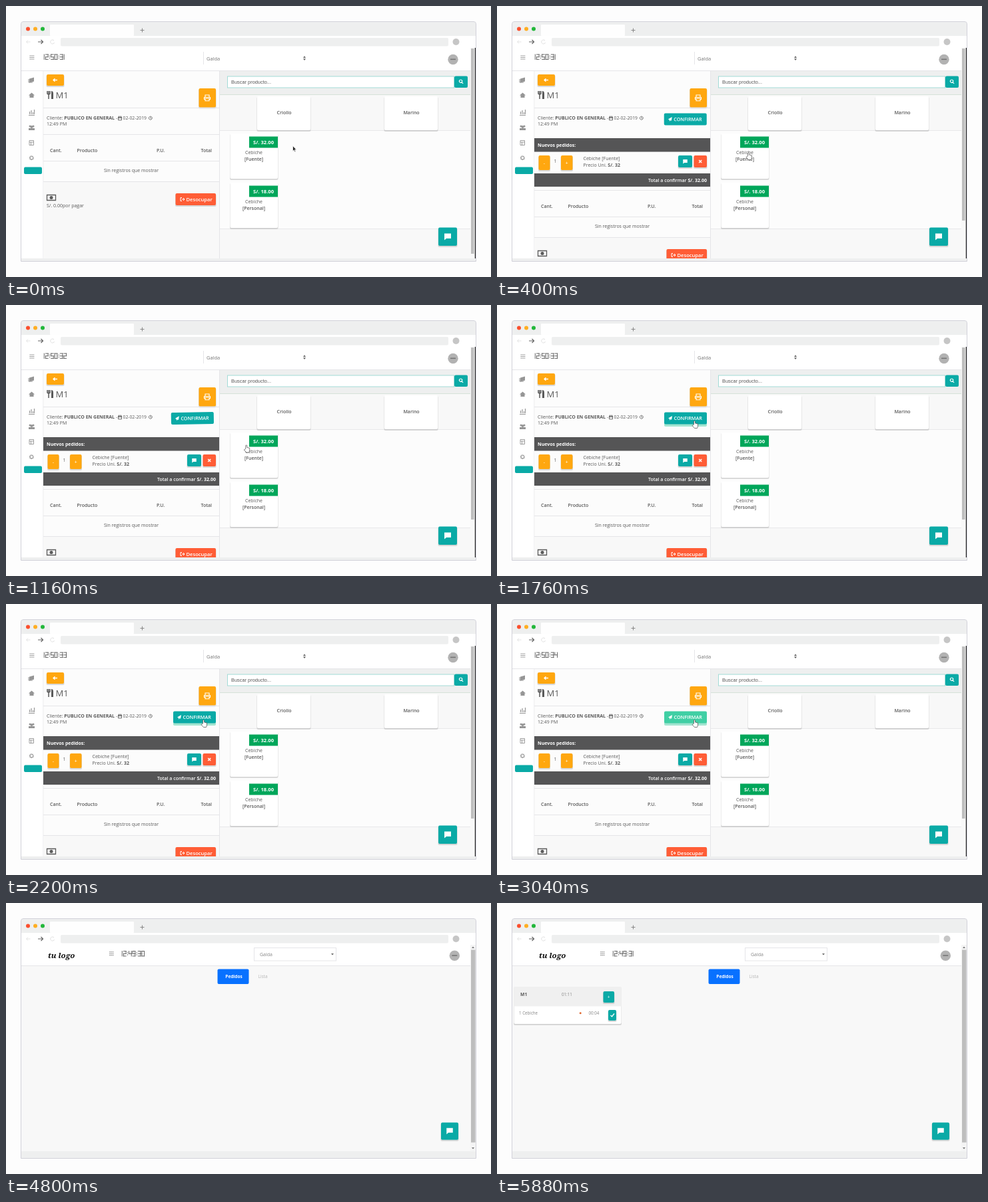
These frames come from a looping animation (728x408 px, 6 s). An HTML page:

```html
<!DOCTYPE html>
<html lang="es">
<head>
<meta charset="utf-8">
<style>
html, body { margin: 0; width: 100%; height: 100%; overflow: hidden; background: #fdfdfd; }
svg { display: block; width: 100vw; height: 100vh; }
text { font-family: "Open Sans", sans-serif; white-space: pre; }
</style>
</head>
<body>
<svg id="stage" viewBox="0 0 728 408"></svg>
<script>
const INK = '#5a5a5a', TINT = '#eeefef', PALE = '#f8f8f8', SOFT = '#fcfcfc', EDGE = '#e5e5e8';
const TEAL = '#0aaaa6', ORANGE = '#ffa70f', RED = '#ff5d36', DARK = '#555556';
const LOOP = 6000;

const rect = (x, y, w, h, fill, more = '') =>
  `<rect x="${x}" y="${y}" width="${w}" height="${h}" fill="${fill}" ${more}/>`;
const round = (x, y, w, h, fill, more = '') => rect(x, y, w, h, fill, 'rx="2" ' + more);
const raised = (x, y, w, h, fill) =>
  round(x - .5, y + 1, w + 1, h + 1, '#707070', 'opacity=".25"') + round(x, y, w, h, fill);
const text = (x, y, s, more = '', size = 7, fill = INK) =>
  `<text x="${x}" y="${y}" font-size="${size}" fill="${fill}" ${more}>${s}</text>`;
const path = (d, color = INK, width = 1, more = '') =>
  `<path d="${d}" fill="none" stroke="${color}" stroke-width="${width}" ${more}/>`;
const shape = (d, fill, more = '') => `<path d="${d}" fill="${fill}" ${more}/>`;
const dot = (x, y, r, fill) => `<circle cx="${x}" cy="${y}" r="${r}" fill="${fill}"/>`;
const group = (id, body, more = '') => `<g id="${id}" ${more}>${body}</g>`;
const BOLD = 'font-weight="700"', SEMI = 'font-weight="600"';
const MID = 'text-anchor="middle" ', END = 'text-anchor="end" ';

const bubble = (x, y, s = 1) =>
  shape('M-5-4.5h10v7.5h-7l-3 2.5z', '#fff', `transform="translate(${x} ${y}) scale(${s})"`);
const menu = (x, y) => path(`M${x} ${y}h7m-7 2.5h7m-7 2.5h7`, '#8c8c8c', 1.1, 'stroke-dasharray="1.8 .4"');
const avatar = (x, y) => dot(x, y, 7.7, '#b2b2b2') + rect(x - 4, y - 1, 8, 1.6, '#767676');

function browser() {
  return rect(0, 0, 728, 408, '#fdfdfd') +
    rect(22.5, 23.5, 682.5, 361, '#fff', 'rx="3"') +
    shape('M23 45V27q0-3 3-3H702q3 0 3 3V45z', TINT) +
    rect(66, 28, 126, 17, '#fefefe', 'rx="1"') +
    dot(33, 34.5, 3, '#fb4f2e') + dot(44, 34.5, 3, '#ffae22') + dot(55, 34.5, 3, '#22b73a') +
    path('M201.5 36.5h6m-3-3v6', '#888') +
    path('M36.5 54h-6m2.5-2.5-2.5 2.5 2.5 2.5', '#e4e4e4') +
    path('M48 54h7.5m-3-3 3 3-3 3', '#666', 1.2) +
    path('M72 52a3 3 0 1 0 .6 3', '#e0e0e0') +
    round(82, 48, 582, 12.5, TINT) + dot(675.5, 54, 5, '#c6c6c6');
}

function sidebar() {
  const c = '#969696';
  return path('M56 98V380', EDGE) +
    shape('M35 109.5l7-2v6l-7 2z', c) + path('M34 110v5h6', c) +
    shape('M34 134.5l4.5-4 4.5 4h-1.5v3.5h-6v-3.5z', c) +
    path('M34 164.5h9M35.5 163v-4m2.5 4v-6m2.5 6v-3m2 3v-7', c, 1.2) +
    dot(36, 181, 1.5, c) + dot(41, 181, 1.5, c) + dot(38.5, 182, 2, c) +
    shape('M34 187v-3h9v3z', c) +
    path('M35 202.5h6.5v7H35zm0 2.5h6.5M37.5 205v4.5', c, .9) +
    path('M38.3 226.2a2.5 2.5 0 1 0 .1 0', c, 1.8, 'stroke-dasharray="1.6 .5"') +
    round(27, 242.5, 27, 10.5, TEAL);
}

function table() {
  return path('M56 193.5H320M56 233.5H320M56 264.5H320', EDGE) +
    rect(56, 265, 264, 115, PALE) +
    text(66, 220, 'Cant.', SEMI) + text(106.5, 220, 'Producto', SEMI) +
    text(226, 220, 'P.U.', SEMI) + text(309, 220, 'Total', END + SEMI) +
    text(188, 250, 'Sin registros que mostrar', MID) +
    path('M61.5 284.5h13v8h-13z', INK, 1.3) + dot(68, 288.5, 2.5, INK) +
    text(61, 303, 'S/. 0.00por pagar') +
    raised(254.5, 282, 60.5, 18, RED) +
    path('M264 288.5h-2v5h2m0-2.5h4m-2-2 2 2-2 2', '#fff') +
    text(270.5, 294, 'Desocupar', SEMI, 7.6, '#fff');
}

function order() {
  return rect(56, 199, 264, 74, SOFT) +
    rect(56, 199, 264, 20.5, DARK) + text(61, 212, 'Nuevos pedidos:', BOLD, 7, '#fff') +
    raised(62.5, 225, 17, 22, ORANGE) + raised(96, 225, 17.5, 22, ORANGE) +
    text(71, 238.5, '-', MID, 7, '#fff') + text(104.7, 238.5, '+', MID, 7, '#fff') +
    text(87.5, 236, '1', MID) +
    text(129.5, 232, 'Cebiche [Fuente]') +
    text(129.5, 242, 'Precio Uni. <tspan font-weight="700">S/. 32</tspan>') +
    raised(272, 225, 21, 18, TEAL) + bubble(282.5, 234, .65) +
    raised(295.5, 225, 19.5, 18, RED) + path('M303.2 232l4 4m0-4-4 4', '#fff', 1.5) +
    rect(56, 252, 264, 20, DARK) +
    text(315, 265, 'Total a confirmar <tspan font-weight="700">S/. 32.00</tspan>', END + SEMI, 7, '#fff') +
    group('confirm',
      round(251, 164, 64, 19, '#35c79c', 'id="glow" opacity="0"') +
      round(251, 161.5, 64, 18, TEAL, 'id="face"') +
      shape('M263 167l-6 3.5 1.8.8.4 2.4 1.2-1.6 1.6.6z', '#fff') +
      text(265.5, 173.2, 'CONFIRMAR', SEMI, 7.2, '#fff'));
}

function product(y, name, price) {
  return raised(336.5, y, 71.5, 68, '#fff') +
    rect(365, y + 4.5, 43, 17, '#00a65a') +
    text(386.5, y + 15.5, price, MID + BOLD, 7.6, '#fff') +
    text(372, y + 31, 'Cebiche', MID) + text(372, y + 41, name, MID + SEMI);
}

function sales() {
  const category = (x, name) => raised(x, 136, 80, 51, '#fff') +
    text(x + 40.5, 163.3, name, MID + SEMI);
  return rect(23, 63, 682, 317, '#fff') + menu(35.5, 75) +
    path('M296.5 69V88', EDGE) + text(301, 81.5, 'Galda', '', 7.5, '#757575') +
    shape('M446 78l2-2.7 2 2.7zm0 1.2h4l-2 2.7z', '#666') + avatar(671, 80.5) +
    path('M23 97.5H697', EDGE) + sidebar() +
    rect(56.5, 98, 264, 282, SOFT) +
    raised(61, 103, 26, 17, ORANGE) + path('M77 111.5h-6m2.5-2.3-2.5 2.3 2.5 2.3', '#fff', 1.3) +
    path('M62 128v4q2 2 4 0v-4m-2 0v12', INK, 1.5) +
    shape('M68 140v-12q3 0 3 4v8z', INK) +
    text(74.5, 138.7, 'M1', '', 13) +
    raised(289.5, 124, 25.5, 28.5, ORANGE) +
    path('M299 137.5v-3.5h6v3.5m-6 3h-1.5v-3h9v3h-1.5m-6-1.2h6v3.4h-6z', '#fff', 1.1) +
    path('M56 153.5H320', EDGE) +
    text(61, 171, 'Cliente: <tspan font-weight="700">PUBLICO EN GENERAL</tspan> -') +
    path('M168.5 167h5v4.8h-5zm0 1.5h5m-3.8-3v2m2.6-2v2', INK, .9) +
    text(175.5, 171, '02-02-2019', '', 6.8) +
    path('M216.8 166.2a2.5 2.5 0 1 0 .1 0m0 1.1v1.6h1.2', INK, .8) +
    text(61, 180.3, '12:49 PM') +
    `<g clip-path="url(#page)">${group('table', table()) + group('order', order())}</g>` +
    rect(321, 98, 376, 35, TINT) + rect(321, 134, 376, 54, PALE) +
    rect(321, 188, 376, 147, SOFT) + rect(321, 335, 376, 45, PALE) +
    path('M320.5 98V380', EDGE) +
    path('M321 133.5H697', '#d5e2d9') + path('M321 187.5H697M321 335.5H697', EDGE, .8) +
    rect(332.5, 106, 340, 17, '#fff', 'stroke="#a2dbd6"') +
    text(338, 117, 'Buscar producto...', 'style="font-family:\'Liberation Sans\',sans-serif"', 7.4) +
    round(673, 105.5, 20, 17.5, TEAL) +
    path('M682.5 111a2.2 2.2 0 1 0 .1 0m1.5 3.9 2 2', '#fff', 1.2) +
    category(377, 'Criollo') + category(568, 'Marino') +
    product(192, '[Fuente]', 'S/. 32.00') + product(266, '[Personal]', 'S/. 18.00') +
    raised(649, 333.5, 28, 27.5, TEAL) + bubble(663, 347) +
    rect(697, 63, 7, 317, '#f8f8f8') + rect(698, 64, 4.5, 309, '#bebebe', 'id="thumb"') +
    rect(703.8, 63, 1.4, 317, '#222') +
    rect(23, 380, 682, 4, TINT);
}

function kitchen() {
  return rect(23, 63, 682, 317, '#fff') + rect(23, 94.5, 674, 279, PALE) +
    rect(23, 373.5, 682, 10.5, TINT) + path('M23 94.5H697', EDGE) +
    text(63, 83, 'tu logo', BOLD + ' font-style="italic" style="font-family:\'Noto Serif\',serif"', 11.5, '#111') +
    menu(155, 73.8) +
    rect(372.5, 67.5, 123, 19.5, '#fff', `stroke="${EDGE}"`) +
    text(381, 80, 'Galda', '', 7, '#858585') + shape('M488 76h4l-2 2.5z', '#666') +
    avatar(673.3, 79.3) +
    round(317.5, 99.5, 47, 22.5, '#0871ff') +
    text(342, 113.3, 'Pedidos', MID + BOLD, 6.5, '#fff') + text(378.5, 113.3, 'Lista', '', 6.5, '#b5b5b5') +
    raised(653, 330.5, 26, 26, TEAL) + bubble(666, 343, .95) +
    rect(697, 63, 8, 310.5, '#f4f4f4') + rect(698, 70.5, 6.5, 290, '#bebebe') +
    shape('M699 68h4l-2-2.5zm0 300h4l-2 2.5z', '#777') +
    group('ticket',
      raised(25.5, 126, 161, 56, '#fff') + rect(25.5, 126, 161, 29.5, '#f0f0f0') +
      text(35, 139.8, 'M1', BOLD, 6.8) +
      text(97, 139.5, '', 'id="total"', 6.2, '#858585') +
      raised(159.5, 133, 16.5, 17, TEAL) + text(167.7, 143.8, '+', MID, 6.5, '#fff') +
      text(33, 167.6, '1 Cebiche', '', 6.2, '#858585') + dot(125.2, 165.7, 1.5, '#e06a33') +
      text(137.5, 167.6, '', 'id="wait"', 6.2, '#858585') +
      raised(167, 161, 12, 16, TEAL) + path('M170.5 169l2 2 3.5-4.5', '#fff', 1.3));
}

const hand = 'M-1.5 0V-5q1-1 2 0v3l4 1v4l-1 2.5h-4l-3.5-4z';
const arrow = 'M-1.5-2.5v8l1.8-1.6 1.3 2.8 1.2-.6-1.3-2.7h2.3z';

const svg = document.getElementById('stage');
svg.innerHTML = '<clipPath id="page"><rect x="23" y="63" width="682" height="317"/></clipPath>' +
  browser() + group('sales', sales()) + group('kitchen', kitchen()) +
  path('', '#555', .9, 'id="clock" stroke-linecap="square"') +
  path('M22.5 384.5V27q0-3.5 3.5-3.5H702q3.5 0 3.5 3.5V384.5z', '#d2d2da') +
  shape(arrow, '#222', 'id="cursor" stroke="#fff" stroke-width=".7"');

const $ = id => document.getElementById(id);
const set = (id, name, value) => $(id).setAttribute(name, value);
const show = (id, on) => set(id, 'visibility', on ? 'visible' : 'hidden');
const clamp = v => Math.min(1, Math.max(0, v));
const ease = v => { v = clamp(v); return v * v * (3 - 2 * v); };

// Seven-segment strokes, clockwise from the top, the middle one last
const STROKES = [[0, 0, 'h3.6'], [3.6, 0, 'v3.7'], [3.6, 3.7, 'v3.7'], [0, 7.4, 'h3.6'],
  [0, 3.7, 'v3.7'], [0, 0, 'v3.7'], [0, 3.7, 'h3.6']];
const DIGITS = [63, 6, 91, 79, 102, 109, 125, 7, 127, 111];

function clockPath(label, x, y) {
  let d = '';
  const line = (dx, dy, to) => { d += `M${x + dx} ${y + dy}${to}`; };
  for (const c of label) {
    if (c === ':') { line(.5, 2.2, 'v.4'); line(.5, 5.2, 'v.4'); }
    else if (c === '1') line(.3, 0, 'v7.4');
    else STROKES.forEach((s, i) => { if (DIGITS[c] >> i & 1) line(...s); });
    x += c === ':' || c === '1' ? 2.5 : 5.6;
  }
  return d;
}

// Decaying shake: [progress, shift, degrees]
const WOBBLE = [[0, 0, 0], [.15, -16, -5], [.3, 12.8, 3], [.45, -9.6, -3],
  [.6, 6.4, 2], [.75, -3.2, -1], [1, 0, 0]];
function wobble(p) {
  p = clamp(p);
  const i = Math.max(1, WOBBLE.findIndex(k => k[0] >= p));
  const a = WOBBLE[i - 1], b = WOBBLE[i], q = ease((p - a[0]) / (b[0] - a[0]));
  return [a[1] + (b[1] - a[1]) * q, a[2] + (b[2] - a[2]) * q];
}

function draw(t) {
  const cooking = t >= 4200, ordered = t >= 390;
  show('sales', !cooking);
  show('kitchen', cooking);
  set('clock', 'd', cooking
    ? clockPath('12:49:' + (t < 5300 ? 30 : 31), 174, 72.5)
    : clockPath('12:50:' + (31 + Math.floor((t + 400) / 1000)), 57, 73));

  set('order', 'display', ordered ? 'inline' : 'none');
  set('table', 'transform', `translate(0 ${ordered ? 84 : 0})`);
  set('thumb', 'height', ordered ? 259 : 309);
  const [shift, turn] = wobble((t - 390) / 1000);
  set('confirm', 'transform', `translate(${shift} 0) rotate(${turn} 283 170.5)`);
  set('glow', 'opacity', .45 * ease((t - 1500) / 200));
  const sent = ease((t - 2600) / 250), mix = (a, b) => Math.round(a + (b - a) * sent);
  set('face', 'fill', `rgb(${mix(10, 64)},${mix(170, 207)},${mix(166, 164)})`);

  const first = ease((t - 40) / 290), second = ease((t - 1000) / 550);
  const x = 432 - 54 * first - 81 * second, y = 213 + 13 * first - 46 * second;
  const pointing = first > .6 && (second < .35 || second > .75);
  set('cursor', 'd', pointing ? hand : arrow);
  set('cursor', 'fill', pointing ? '#fff' : '#222');
  set('cursor', 'stroke', pointing ? '#4a4a4a' : '#fff');
  set('cursor', 'transform', `translate(${x} ${y})`);
  set('cursor', 'display', t < 3400 ? 'inline' : 'none');

  const late = t >= 5760;
  set('ticket', 'opacity', clamp((t - 5200) / 160));
  $('total').textContent = late ? '01:11' : '01:10';
  $('wait').textContent = late ? '00:04' : '00:03';
}

const start = performance.now();
function frame() {
  draw((performance.now() - start) % LOOP);
  requestAnimationFrame(frame);
}
draw(0);
requestAnimationFrame(frame);
</script>
</body>
</html>
```
